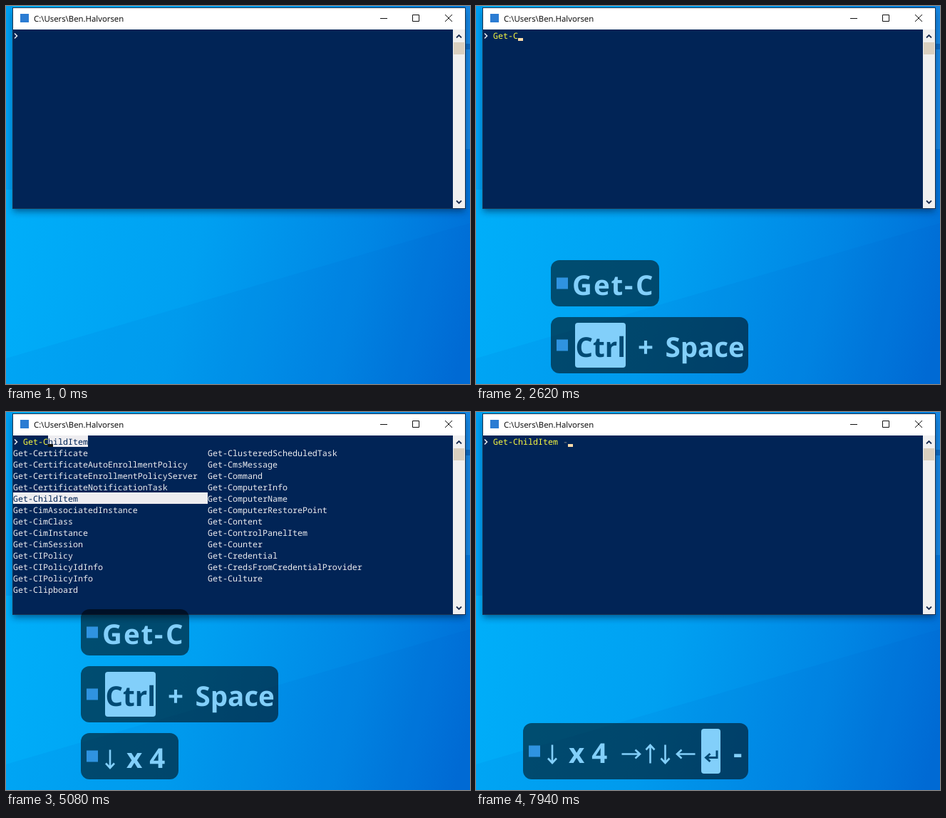
Animation, 651 px wide and 531 px high, one loop 8 s. Source, as an HTML page:

```html
<!DOCTYPE html>
<html lang="en">
<head>
<meta charset="utf-8">
<title>Menu completion</title>
<style>
  html, body { margin: 0; width: 100%; height: 100%; overflow: hidden; background: #009cf0; }
  svg { display: block; width: 651px; height: 531px; }
  text { white-space: pre; text-rendering: geometricPrecision; }
  .title { font: 11.4px "Open Sans", "Noto Sans", sans-serif; }
  .mono { font: 11.667px "Noto Sans Mono", "DejaVu Sans Mono", monospace; }
  .key { font: bold 38.5px "Open Sans", "Noto Sans", sans-serif; }
</style>
</head>
<body>
<svg viewBox="0 0 651 531">
  <defs>
    <linearGradient id="sky" gradientUnits="userSpaceOnUse" x1="0" y1="330" x2="640" y2="490">
      <stop offset="0" stop-color="#00aef9"/>
      <stop offset=".4" stop-color="#00a0f1"/>
      <stop offset=".75" stop-color="#0086e4"/>
      <stop offset="1" stop-color="#006dd6"/>
    </linearGradient>
    <filter id="blur" x="-10%" y="-10%" width="120%" height="125%"><feGaussianBlur stdDeviation="5"/></filter>
  </defs>
  <rect width="651" height="531" fill="url(#sky)"/>
  <path d="M0 495L651 305V531H0Z" fill="#0050b0" opacity=".07"/>
  <path d="M0 0H10V258H0Z" fill="#0098ee" opacity=".6"/>
  <path d="M644 0H651V201H644Z" fill="#1687e2"/>
  <path d="M644 53H651V61H644Z" fill="#0a66bd"/>
  <rect x="10" y="8" width="634" height="281" fill="#00204a" opacity=".55" filter="url(#blur)"/>
  <rect x="9" y="2" width="636" height="283" fill="#1b3350"/>
  <rect x="10" y="3" width="634" height="30" fill="#fff"/>
  <rect x="10" y="33" width="617" height="251" fill="#012456"/>
  <rect x="627" y="33" width="17" height="251" fill="#f0f0f0"/>
  <rect x="628" y="51" width="15" height="17" fill="#d9cfbf"/>
  <path d="M632 44.5l3.5-3.5 3.5 3.5M632 273.500l3.500 3.500 3.500-3.500" fill="none" stroke="#1c2e50" stroke-width="1.8"/>
  <path d="M525 17.500h10M570.500 12.500h9v9h-9zM616 12l10 10M626 12l-10 10" fill="none" stroke="#111"/>
  <rect x="20" y="11" width="12" height="12" fill="#2b7cd3"/>
  <text class="title" x="39" y="22">C:\Users\Ben.Halvorsen</text>
  <path d="M12 38.500l3.500 3.500-3.500 3.500" fill="none" stroke="#eeedf0" stroke-width="1.500"/>
  <g id="live"></g>
</svg>
<script>
const LOOP = 8000, PALE = '#eeedf0', NAVY = '#012456', LIGHT = '#82cffa', DARK = '#004a74';
const PER_COLUMN = 13;
const names = ('Certificate CertificateAutoEnrollmentPolicy CertificateEnrollmentPolicyServer ' +
  'CertificateNotificationTask ChildItem CimAssociatedInstance CimClass CimInstance CimSession ' +
  'CIPolicy CIPolicyIdInfo CIPolicyInfo Clipboard ClusteredScheduledTask CmsMessage Command ' +
  'ComputerInfo ComputerName ComputerRestorePoint Content ControlPanelItem Counter Credential ' +
  'CredsFromCredentialProvider Culture').split(' ');

// Each step changes part of the state.
// typed: letters in the first bubble, keys: tokens in the last one, sel: menu entry (-1 = closed)
const steps = [
  [0, { cmd: '', param: '', cursor: 0, sel: -1, typed: 0, combo: 0, keys: 0, count: 1 }],
  [150, { cmd: 'G', cursor: 1 }],
  [240, { typed: 1 }],
  [470, { cmd: 'Ge', typed: 2 }],
  [550, { cmd: 'Get', typed: 3 }],
  [950, { cursor: 0 }],
  [1180, { cmd: 'Get-', typed: 4, cursor: 1 }],
  [1500, { cursor: 0 }],
  [1900, { cmd: 'Get-C', typed: 5, cursor: 1 }],
  [2050, { cursor: 0 }],
  [2560, { cursor: 1 }],
  [2620, { combo: 1 }],
  [2690, { sel: 0 }],
  [3090, { cursor: 0 }],
  [3650, { cursor: 1 }],
  [3950, { sel: 1, keys: 1 }],
  [4120, { cursor: 0 }],
  [4280, { sel: 2, keys: 2, count: 2, cursor: 1 }],
  [4620, { sel: 3 }],
  [4700, { count: 3 }],
  [5080, { sel: 4, count: 4 }],
  [5240, { sel: 17, keys: 3 }],
  [5640, { sel: 16 }],
  [5720, { cursor: 0 }],
  [6040, { sel: 17, keys: 5, cursor: 1 }],
  [6270, { sel: 4, keys: 6, cursor: 0 }],
  [6770, { cursor: 1 }],
  [6930, { sel: -1, cmd: 'Get-ChildItem' }],
  [7010, { typed: 0, combo: 0, keys: 7 }],
  [7330, { cursor: 0 }],
  [7630, { param: ' ', cursor: 1 }],
  [7710, { keys: 8 }],
  [7880, { param: ' -' }],
  [7940, { keys: 9 }]
];

const rect = (x, y, w, h, fill, extra = '') =>
  `<rect x="${x}" y="${y}" width="${w}" height="${h}" fill="${fill}" ${extra}/>`;
const text = (cls, x, y, fill, str) => `<text class="${cls}" x="${x}" y="${y}" fill="${fill}">${str}</text>`;
const mono = (col, row, fill, str) => text('mono', 10 + 7 * col, 46 + 16 * row, fill, str);
const cell = (col, row, cols) => rect(10 + 7 * col, 33 + 16 * row, 7 * cols, 16, PALE);

function terminal(s) {
  const open = s.sel >= 0, end = 2 + s.cmd.length;
  let out = mono(2, 0, '#f8f840', s.cmd) + mono(end, 0, '#8a8a8a', s.param);
  if (open) {
    const rest = names[s.sel].slice(1);
    out += cell(end, 0, rest.length) + mono(end, 0, NAVY, rest);
    names.forEach((name, i) => {
      const col = i < PER_COLUMN ? 0 : 39, row = 1 + i % PER_COLUMN, on = i === s.sel;
      if (on) out += cell(col, row, 39);
      out += mono(col, row, on ? NAVY : PALE, 'Get-' + name);
    });
  }
  if (s.cursor) out += rect(10 + 7 * (end + s.param.length), 45, 7, 4, open ? '#11120f' : '#fedba9');
  return out;
}

// Bubble contents use the bubble's left edge and vertical middle as origin.
const label = (x, str, fill = LIGHT) => text('key', x, 16.5, fill, str);
const cap = (x, w) => rect(x, -31.5, w, 63, LIGHT, 'rx="4"');
const arrow = (x, angle, half = 13) =>
  `<path transform="translate(${x} 4) rotate(${angle})" d="M${-half} 0H${half - 1}M${half - 7} -6L${half - 0.5} 0L${half - 7} 6"
    fill="none" stroke="${LIGHT}" stroke-width="2.6"/>`;

function typedBubble(n) {
  const xs = [30, 60, 84.5, 103, 119], widths = [65, 90, 108, 126, 152];
  const body = [...'Get-C'].slice(0, n).map((ch, i) => label(xs[i], ch)).join('');
  return { w: widths[n - 1], h: 65, body };
}

function comboBubble() {
  return { w: 277, h: 79, body: cap(34, 71) + label(34.5, 'Ctrl', DARK) + label(122, '+') + label(160.5, 'Space') };
}

function keysBubble(n, count) {
  const widths = [57, 137, 172, 193, 214, 252, 287, 298, 316];
  const enter = cap(250, 27) +
    `<path d="M272 -1V9H257M262.500 3.500L256.500 9L262.500 14.500" fill="none" stroke="${DARK}" stroke-width="3"/>`;
  const tokens = [arrow(41, 90), label(64, 'x ' + count), arrow(151.5, 0), arrow(178.5, -90),
    arrow(199.5, 90), arrow(228.5, 180), enter, '', label(295, '-')];
  return { w: widths[n - 1], h: n > 6 ? 79 : 65, body: tokens.slice(0, n).join('') };
}

// Bubbles stack upwards; the widest one touches the right edge.
function overlay(s) {
  const list = [];
  if (s.keys) list.push(keysBubble(s.keys, s.count));
  if (s.combo) list.push(comboBubble());
  if (s.typed) list.push(typedBubble(s.typed));
  const left = 382 - Math.max(...list.map(b => b.w));
  let bottom = 516;
  return list.map(b => {
    const mid = bottom - b.h / 2;
    bottom -= b.h + 15;
    return `<g transform="translate(${left} ${mid})">` +
      rect(0, -b.h / 2, b.w, b.h, '#000', 'rx="12" opacity=".54"') +
      rect(8, -8, 16, 16, '#2f93e0') + b.body + '</g>';
  }).join('');
}

const live = document.getElementById('live');
let shown = 0;
function frame(now) {
  const t = now % LOOP;
  const past = steps.filter(([at]) => at <= t);
  if (past.length !== shown) {
    shown = past.length;
    const state = Object.assign({}, ...past.map(([, change]) => change));
    live.innerHTML = terminal(state) + overlay(state);
  }
  requestAnimationFrame(() => frame(performance.now()));
}
frame(0);
</script>
</body>
</html>
```
